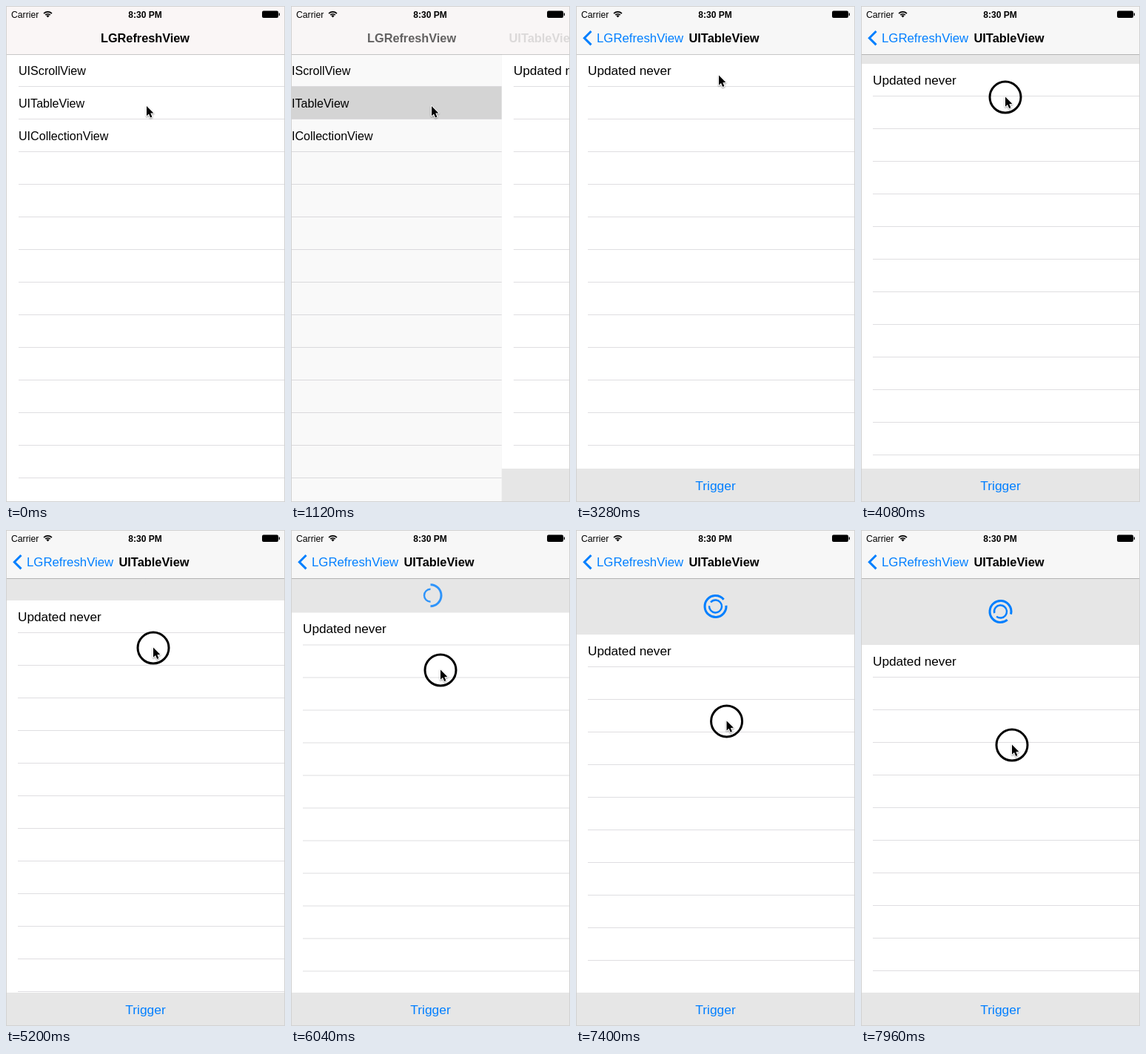
Animation, 377 px wide and 669 px high, one loop 8000 ms. Source, as an HTML page with a canvas:

```html
<!DOCTYPE html>
<html lang="en">
<head>
<meta charset="utf-8">
<title>Pull to refresh</title>
<style>
html, body { margin: 0; width: 100%; height: 100%; overflow: hidden; background: #fff; }
canvas { display: block; }
</style>
</head>
<body>
<canvas id="stage" width="377" height="669"></canvas>
<script>
const W = 377, H = 669, LOOP = 8000, BAR = 65, ROW = 44, TOOLBAR = 624;
const BLUE = '#007fff', GREY = '#e6e6e6', LINE = '#dfdee1';
const g = document.getElementById('stage').getContext('2d');

// time, pointer x, pointer y, pull distance
const PATH = [
  [0, 190, 135, 0], [2920, 190, 135, 0], [3200, 193, 94, 0], [3400, 193, 93, 0],
  [3720, 194, 106, 6], [4080, 195, 122.5, 13], [4560, 197, 142, 22], [5200, 199, 158.5, 30],
  [5400, 200, 167, 34], [6040, 202, 188.5, 46.5], [6240, 202, 197, 50],
  [6760, 203, 223.5, 61.5], [7080, 203.3, 239, 68], [7960, 204, 289.5, 90], [8000, 204, 292, 91]
];
const PUSH_START = 1060, PUSH_TIME = 580;

const clamp = v => Math.max(0, Math.min(1, v));

function sample(t) {
  const i = PATH.findIndex(p => p[0] > t);
  const a = PATH[i - 1], b = PATH[i], k = (t - a[0]) / (b[0] - a[0]);
  return a.slice(1).map((v, n) => v + (b[n + 1] - v) * k);
}

function rect(x, y, w, h, color) {
  g.fillStyle = color;
  g.fillRect(x, y, w, h);
}

function text(str, x, y, size, color = '#000', bold = false, align = 'left') {
  g.font = `${bold ? 'bold ' : ''}${size}px "Liberation Sans", Arial, sans-serif`;
  g.textAlign = align;
  g.fillStyle = color;
  g.fillText(str, x, y);
}

function arc(x, y, r, from, to, width, color, ccw = false) {
  g.beginPath();
  g.arc(x, y, r, from, to, ccw);
  g.lineWidth = width;
  g.strokeStyle = color;
  g.stroke();
}

function faded(alpha, draw) {
  g.save();
  g.globalAlpha = clamp(alpha);
  draw();
  g.restore();
}

function rows(top, left) {
  for (let y = top + ROW - 1; y < H; y += ROW) rect(left, y, W - left, 1, LINE);
}

function menuPage(x, selected) {
  g.save();
  g.translate(x, 0);
  rect(0, BAR, W, H, '#fff');
  if (selected) rect(0, 109, W, 43, '#d9d9d9');
  rows(BAR, 17);
  ['UIScrollView', 'UITableView', 'UICollectionView']
    .forEach((name, i) => text(name, 17, 92.5 + i * ROW, 16.1));
  g.restore();
}

function spinner(pull) {
  const part = Math.min(0.9, (pull - 30) / 33);
  if (part <= 0) return;
  const turn = Math.max(0, pull - 54) * 3.9 * Math.PI / 180;
  const top = -Math.PI / 2, span = part * 2 * Math.PI, y = BAR + pull / 2;
  faded(0.3 + part, () => {
    arc(188.5, y, 14.5, top + turn, top + turn + span, 3, BLUE);
    arc(188.5, y, 8.5, top - turn, top - turn - span, 2.4, BLUE, true);
  });
}

function tablePage(x, pull) {
  g.save();
  g.translate(x, 0);
  rect(0, BAR, W, H, GREY);
  spinner(pull);
  rect(0, BAR + pull, W, H, '#fff');
  rows(BAR + pull, 16);
  text('Updated never', 16, 92.5 + pull, 17.2);
  rect(0, TOOLBAR, W, H - TOOLBAR, GREY);
  text('Trigger', 188.5, 653, 17.4, BLUE, false, 'center');
  g.restore();
}

function statusBar() {
  text('Carrier', 7, 16, 12.2);
  text('8:30 PM', 188, 16, 12, '#000', true, 'center');
  const up = -Math.PI / 2;
  [1.5, 4.6, 7.7].forEach(r => arc(56.5, 15.5, r, up - 0.78, up + 0.78, r < 2 ? 3 : 1.8, '#000'));
  g.beginPath();
  g.roundRect(346, 6.5, 22, 9.5, 2);
  g.fillStyle = '#000';
  g.fill();
  rect(368.7, 9.5, 1.3, 3.5, '#000');
}

function navBar(k) {
  rect(0, 0, W, BAR, '#f7f7f7');
  faded(1 - k, () => rect(0, 0, W, BAR, '#faf6f6'));
  rect(0, BAR, W, 1, 'rgba(0,0,0,.22)');
  statusBar();
  const shift = 102 * k;
  faded(1 - k * 1.6, () => text('LGRefreshView', 188 - shift, 49, 16.3, '#000', true, 'center'));
  faded(k * 1.6 - 0.6, () => {
    text('LGRefreshView', 28 + 102 - shift, 49, 16.8, BLUE);
    g.beginPath();
    g.moveTo(20.5, 34);
    g.lineTo(11.3, 43.2);
    g.lineTo(20.5, 52.4);
    g.lineWidth = 3;
    g.strokeStyle = BLUE;
    g.stroke();
  });
  faded(k * 1.3 - 0.2, () => text('UITableView', 200 + 188 * (1 - k), 49, 16.4, '#000', true, 'center'));
}

function pointer(x, y, pressed) {
  if (pressed) arc(x, y + 0.5, 21, 0, 2 * Math.PI, 3, '#000');
  g.save();
  g.translate(x, y);
  g.beginPath();
  [[0, 0], [0, 13.2], [3, 10.4], [5.2, 15.4], [7.4, 14.4], [5.3, 9.6], [9.4, 9.4]]
    .forEach(p => g.lineTo(...p));
  g.closePath();
  g.lineJoin = 'round';
  g.lineWidth = 2;
  g.strokeStyle = '#fff';
  g.shadowColor = 'rgba(0,0,0,.4)';
  g.shadowBlur = 2;
  g.shadowOffsetY = 1;
  g.stroke();
  g.shadowColor = 'transparent';
  g.fillStyle = '#000';
  g.fill();
  g.restore();
}

function draw(t) {
  const [x, y, pull] = sample(t);
  const p = clamp((t - PUSH_START) / PUSH_TIME);
  const k = p === 1 ? 1 : 1 - (1 + 9 * p) * Math.exp(-9 * p);
  g.clearRect(0, 0, W, H);
  if (k < 1) {
    menuPage(-0.3 * W * k, t >= 920);
    faded(0.1 * k, () => rect(0, BAR, W, H, '#000'));
  }
  if (k > 0) tablePage(W * (1 - k), pull);
  navBar(k);
  pointer(x, y, (t >= 840 && t < 1000) || t >= 3320);
  g.lineWidth = 1;
  g.strokeStyle = '#d2d2d2';
  g.strokeRect(0.5, 0.5, W - 1, H - 1);
}

const start = performance.now();
function tick() {
  draw((performance.now() - start) % LOOP);
  requestAnimationFrame(tick);
}
tick();
</script>
</body>
</html>
```
